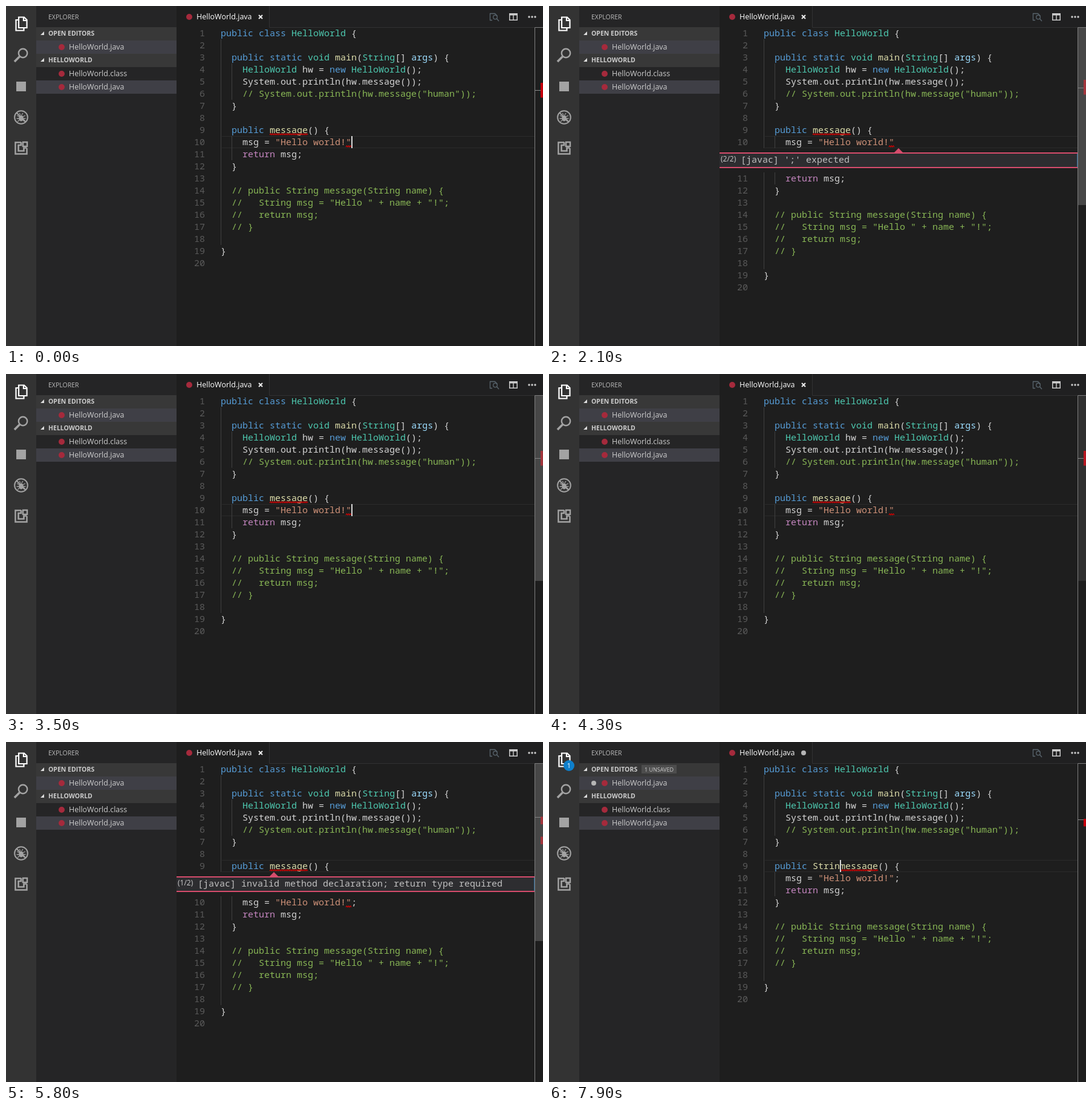
Recreate the animation shown at these times as an HTML page. Size 888 by 562 pixels, loop 8000 ms.

```html
<!DOCTYPE html>
<html lang="en">
<head>
<meta charset="utf-8">
<title>Editor error navigation</title>
<style>
html, body { margin: 0; width: 100%; height: 100%; overflow: hidden; background: #1e1e1e; }
svg { display: block; width: 888px; height: 562px; }
text { white-space: pre; font-family: "Open Sans", "Noto Sans", sans-serif; fill: #ccc; }
.mono { font: 15px "Noto Sans Mono", "DejaVu Sans Mono", monospace; fill: #d4d4d4; }
.num { fill: #5a5a5a; text-anchor: end; }
.file { font-size: 12.5px; }
.head { font-size: 10.5px; font-weight: 700; }
.icon { fill: none; stroke: #a3a3a3; stroke-width: 2.4; }
.squiggle { fill: none; stroke: #e00000; stroke-width: 1.2; }
.guide { fill: #404040; }
.key { fill: #569cd6; }
.type { fill: #4ec9b0; }
.func { fill: #dcdcaa; }
.flow { fill: #c586c0; }
.arg { fill: #9cdcfe; }
.str { fill: #ce9178; }
.note { fill: #88b655; }
</style>
</head>
<body>
<svg viewBox="0 0 888 562">
  <!-- side bars -->
  <rect width="50" height="562" fill="#333"/>
  <rect x="50" width="232" height="562" fill="#252526"/>
  <g fill="#383838"><rect x="50" y="35" width="232" height="22"/><rect x="50" y="79" width="232" height="22"/></g>
  <g fill="#3f3f46"><rect x="50" y="57" width="232" height="22"/><rect x="50" y="123" width="232" height="22"/></g>
  <text x="70" y="22" font-size="10.5" style="fill:#bbb">EXPLORER</text>
  <path d="M63 42v6h-6zM63 86v6h-6z" fill="#ddd"/>
  <text class="head" x="70" y="49">OPEN EDITORS</text>
  <text class="head" x="70" y="93">HELLOWORLD</text>
  <text class="file" x="104" y="72">HelloWorld.java</text>
  <text class="file" x="104" y="116">HelloWorld.class</text>
  <text class="file" x="104" y="138">HelloWorld.java</text>

  <!-- activity icons -->
  <g class="icon">
    <g stroke="#fff" stroke-width="2.2">
      <path d="M21 18.5h9l4.5 4.5v13h-13.500z"/><path d="M29 19v5h5"/>
      <path d="M20 23h-3.500v17.500h13v-4"/>
    </g>
    <circle cx="28" cy="78" r="7.2"/><path d="M22.500 83.500L14 92" stroke-width="3.500"/>
    <rect x="17" y="125" width="16" height="16" fill="#a3a3a3" stroke="none"/>
    <circle cx="25" cy="184" r="10.800" stroke-width="2"/>
    <ellipse cx="25" cy="185.500" rx="3.800" ry="5" fill="#a3a3a3" stroke="none"/>
    <path d="M22 177l2 3M28 177l-2 3M18 181l4 2M32 181l-4 2M17.500 186h15M19 191l4-3M31 191l-4-3" stroke-width="1.300"/>
    <path d="M17.500 176.500l15 15" stroke-width="2"/>
    <path d="M25 225.500h-9.500v19h19v-9.500"/><path d="M25 225v5h-4.500v9.500h9v-5h5" stroke-width="2.600"/>
    <rect x="28" y="225" width="7" height="7"/>
  </g>

  <!-- tab bar -->
  <rect x="436" width="452" height="35" fill="#202021"/>
  <path d="M435.500 0V35.500H888" fill="none" stroke="#323233"/>
  <text class="file" x="315" y="22" style="fill:#fff">HelloWorld.java</text>
  <g fill="#a52a3c"><circle cx="92" cy="68" r="5"/><circle cx="92" cy="112" r="5"/><circle cx="92" cy="134" r="5"/><circle cx="303" cy="18" r="5"/></g>
  <g fill="none" stroke="#59656e" stroke-width="1.300">
    <path d="M804 23.500h-3.500v-11h8l4 4"/><circle cx="809" cy="18.500" r="3.300"/><path d="M811.500 21l3.500 4"/>
  </g>
  <path d="M832 12h14v12h-14zM833.500 15.500v7h4.800v-7zM839.700 15.500v7h4.800v-7z" fill="#ccc" fill-rule="evenodd"/>
  <g fill="#ccc"><circle cx="865" cy="18" r="1.700"/><circle cx="870" cy="18" r="1.700"/><circle cx="875" cy="18" r="1.700"/></g>

  <path id="close" d="M418 15l6 6M424 15l-6 6" stroke="#eee" stroke-width="2"/>
  <g id="dirty">
    <circle cx="33" cy="39" r="9" fill="#0e7fcb"/>
    <text x="33" y="43" font-size="11" text-anchor="middle" style="fill:#fff">1</text>
    <rect x="153" y="38" width="58" height="14" fill="#4d4d4d"/>
    <text x="182" y="48.500" font-size="9" text-anchor="middle">1 UNSAVED</text>
    <circle cx="74" cy="68" r="4" fill="#b5b5b5"/><circle cx="421" cy="18" r="4" fill="#b5b5b5"/>
  </g>

  <path id="current" d="M357 .5H874M357 19.500H874" stroke="#2b2b2b"/>
  <g id="code"></g>

  <!-- error panel -->
  <g id="panel">
    <rect x="282" y="7" width="592" height="26" fill="#2d2d30"/>
    <path d="M873.500 9V31" stroke="#2f6f9f"/>
    <path d="M282 8H874M282 32H874" stroke="#d64c6c" stroke-width="2"/>
    <path id="arrow" d="M-7.500 7.500L0 0L7.500 7.500z" fill="#d64c6c"/>
    <text id="count" x="284" y="22" font-size="12"></text>
    <text id="message" class="mono" x="317" y="24" style="fill:#c0c0c0"></text>
  </g>
  <rect id="caret" width="2" height="20" fill="#d8d8d8"/>

  <!-- overview ruler -->
  <path d="M888 35.500H874.500V562" fill="none" stroke="#7f7f7f"/>
  <path id="tick" d="M875 .5H888" stroke="#8a8a8a"/>
  <g fill="#c4000c"><rect id="mark9" x="884" width="4" height="12.500"/><rect id="mark10" x="884" width="4" height="12.500"/></g>
  <rect id="slider" x="875" y="35" width="13" fill="#797979"/>
</svg>
<script>
const LOOP = 8000, CHAR = 9, LINE = 20, TOP = 35, LEFT = 355;
const OPEN_2 = 1650, CLOSE_2 = 3350, SEMI = 4350, SAVE = 4750, OPEN_1 = 5450, CLOSE_1 = 6620;
const KEYS = [7050, 7300, 7500, 7700, 7850];
const RESETS = [0, OPEN_2, CLOSE_2, SEMI, OPEN_1, CLOSE_1, ...KEYS];
const RESIZES = [OPEN_2, CLOSE_2, OPEN_1, CLOSE_1];

const source = `public class HelloWorld {

  public static void main(String[] args) {
    HelloWorld hw = new HelloWorld();
    System.out.println(hw.message());
    // System.out.println(hw.message("human"));
  }

  public message() {
    msg = "Hello world!"
    return msg;
  }

  // public String message(String name) {
  //   String msg = "Hello " + name + "!";
  //   return msg;
  // }

}
`.split("\n");

const $ = id => document.getElementById(id);
const TOKEN = /(?<note>\/\/.*)|(?<str>".*?")|\b(?<key>public|class|static|new)\b|\b(?<type>void|String|HelloWorld)\b|\b(?<flow>return)\b|\b(?<arg>args)\b|(?<func>\bmain\b|(?<!\.)\b\w*message\b)/g;

function paint(text) {
  return text.replace(TOKEN, (word, ...rest) => {
    const groups = rest[rest.length - 1];
    const kind = Object.keys(groups).find(k => groups[k]);
    return `<tspan class="${kind}">${word}</tspan>`;
  });
}

function wave(width) {
  let d = "M0 18";
  for (let x = 1.5, up = true; x <= width; x += 1.5, up = !up) d += `L${x} ${up ? 16 : 18}`;
  return `<path class="squiggle" d="${d}"/>`;
}

const guide = x => `<rect class="guide" x="${x}" width="1" height="${LINE}"/>`;
const isBody = n => (n > 3 && n < 7) || n === 10 || n === 11;

$("code").innerHTML = source.map((text, i) => {
  const n = i + 1;
  return `<g id="line${n}">${n > 1 && n < 19 ? guide(LEFT) : ""}${isBody(n) ? guide(LEFT + 2 * CHAR) : ""}` +
    `<text class="mono num" x="329" y="15">${n}</text>` +
    `<text class="mono" id="text${n}" x="${LEFT}" y="15">${paint(text)}</text></g>`;
}).join("");
$("line9").insertAdjacentHTML("beforeend", `<g id="wave9">${wave(63)}</g>`);
$("line10").insertAdjacentHTML("beforeend", `<g id="wave10" transform="translate(562 0)">${wave(10)}</g>`);

const show = (id, on) => $(id).setAttribute("visibility", on ? "visible" : "hidden");
const move = (id, x, y) => $(id).setAttribute("transform", `translate(${x} ${y})`);
const lastOf = (times, t) => times.filter(v => v <= t).pop();

const texts = {};
function setLine(n, text) {
  if (texts[n] === text) return;
  texts[n] = text;
  $("text" + n).innerHTML = paint(text);
}

function draw(t) {
  const zone = t >= OPEN_2 && t < CLOSE_2 ? 10 : t >= OPEN_1 && t < CLOSE_1 ? 9 : 0;
  const line = t < OPEN_1 ? 10 : 9;
  const typed = KEYS.filter(v => v <= t).length;
  const semi = t >= SEMI;
  const dirty = (semi && t < SAVE) || typed > 0;
  const lineTop = TOP + (line - 1) * LINE;

  setLine(9, "  public " + "String".slice(0, typed) + "message() {");
  setLine(10, source[9] + (semi ? ";" : ""));
  source.forEach((_, i) => move("line" + (i + 1), 0, TOP + i * LINE + (zone && i >= zone ? 2 * LINE : 0)));
  move("wave9", 436 + typed * CHAR, 0);
  show("wave10", t < CLOSE_1);
  move("current", 0, lineTop);

  const caretX = line === 9 ? 436 + typed * CHAR : 571 + (semi ? CHAR : 0);
  move("caret", caretX, lineTop);
  show("caret", !zone && (t - lastOf(RESETS, t)) % 1000 < 500);

  show("panel", zone);
  if (zone) {
    move("panel", 0, lineTop + LINE);
    move("arrow", caretX + 7, 0);
    $("count").textContent = zone === 9 ? "(1/2)" : "(2/2)";
    $("message").textContent = "[javac] " + (zone === 9 ? "invalid method declaration; return type required" : "';' expected");
  }

  show("dirty", dirty);
  show("close", !dirty);

  move("tick", 0, line === 10 ? (zone ? 135 : 139) : (zone ? 124 : 128));
  $("mark9").setAttribute("y", zone === 10 ? 122 : zone === 9 ? 123.5 : 127);
  $("mark10").setAttribute("y", zone === 10 ? 134 : zone === 9 ? 156.5 : 139);
  show("mark10", t < CLOSE_1);

  const resized = lastOf(RESIZES, t);
  const fade = resized === undefined ? 0 : 1 - Math.min(1, Math.max(0, (t - resized - 500) / 800));
  $("slider").setAttribute("height", zone ? 294 : 307);
  $("slider").setAttribute("opacity", 0.45 * fade);
}

const start = performance.now();
function tick() {
  draw((performance.now() - start) % LOOP);
  requestAnimationFrame(tick);
}
tick();
</script>
</body>
</html>
```
